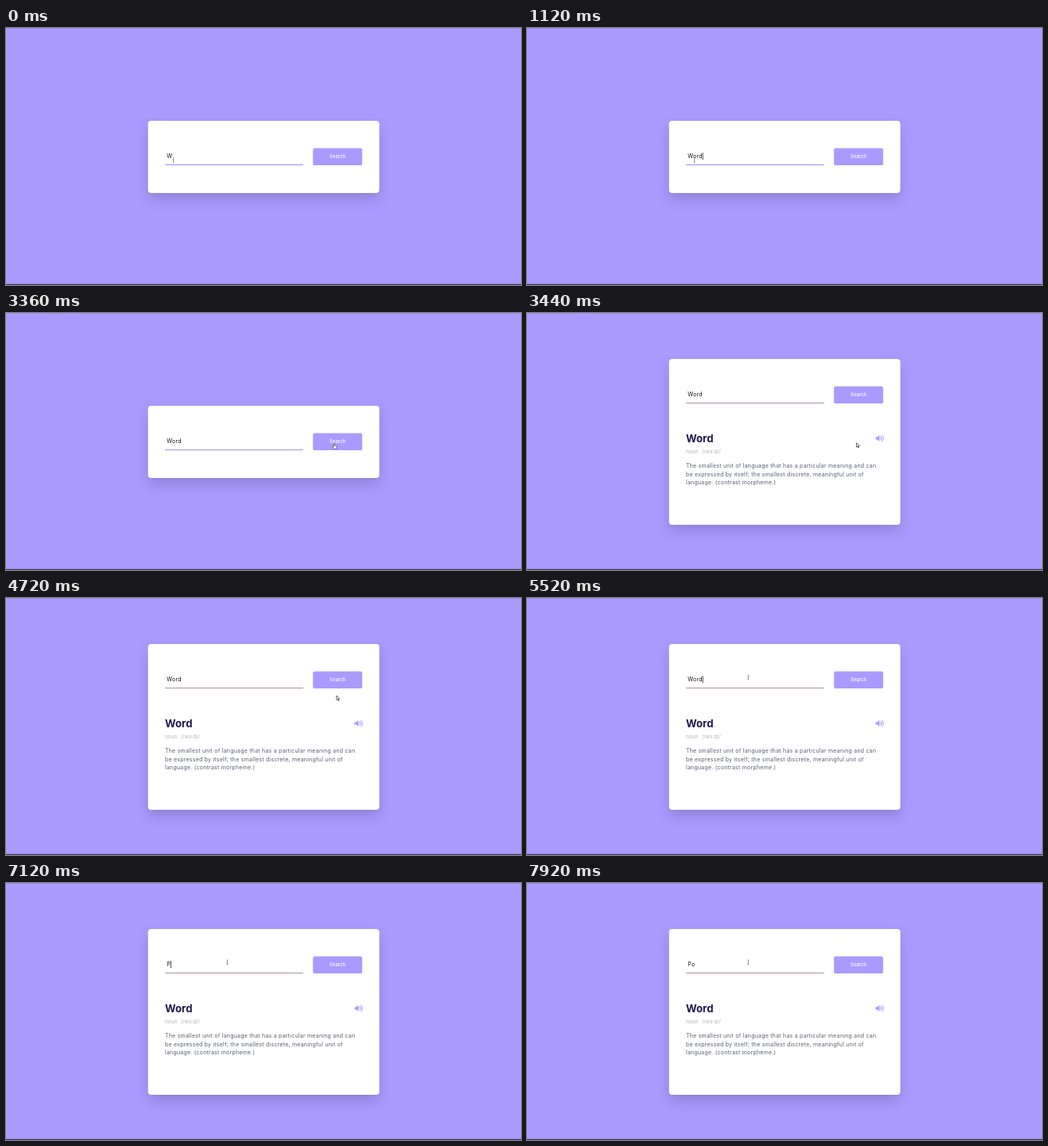
An HTML page for the animation above (8000 ms loop, 648x324 px).

```html
<!DOCTYPE html>
<html lang="en">
<head>
<meta charset="utf-8">
<title>Dictionary search</title>
<style>
  html, body { margin: 0; width: 100%; height: 100%; overflow: hidden; background: #ab9aff; }
  svg { display: block; width: 648px; height: 324px; font-family: Inter, "Open Sans", sans-serif; }
  text { white-space: pre; }
  .card { fill: #fff; filter: drop-shadow(0 8.6px 8px rgba(38, 33, 61, .2)); }
  .accent { fill: #ab9aff; }
  .typed { font-size: 7px; letter-spacing: .033em; fill: #111; }
  .search { font-size: 6px; fill: #fff; text-anchor: middle; font-weight: 500; }
  .word { font-size: 13.2px; font-weight: 700; fill: #1f194c; }
  .details { font-size: 6.5px; fill: #b0afba; }
  .meaning { font-size: 7px; letter-spacing: .033em; fill: #5a5c74; }
</style>
</head>
<body>
<svg viewBox="0 0 648 324">
  <rect class="accent" width="648" height="324"/>
  <rect width="648" height="1" fill="#9b8cdc"/>
  <rect y="322.8" width="648" height="1.2" fill="#3b3650"/>
  <rect id="card" class="card" x="178.7" width="291" rx="4"/>

  <g id="form">
    <rect id="underline" x="200" y="171.9" width="174" height="1.2"/>
    <text id="typed" class="typed" x="202.3" y="164.2"></text>
    <rect id="caret" y="157.2" width=".8" height="9" fill="#222"/>
    <rect class="accent" x="386.2" y="151.6" width="62" height="21.5" rx="2.2"/>
    <text class="search" x="417.2" y="164.3">Search</text>
  </g>

  <g id="result">
    <text class="word" x="200" y="163">Word</text>
    <text class="details" x="200" y="176.8">noun</text>
    <text class="details" x="220" y="176.8">//wɜːd//</text>
    <text class="meaning">
      <tspan x="200" y="195.3">The smallest unit of language that has a particular meaning and can</tspan>
      <tspan x="200" y="205.7">be expressed by itself; the smallest discrete, meaningful unit of</tspan>
      <tspan x="200" y="216.1">language. (contrast morpheme.)</tspan>
    </text>
    <path class="accent" d="M438.6 156.4h2l2.8-2.4v8l-2.8-2.4h-2z"/>
    <path d="M444.6 156.6q1.4 1.4 0 2.8M445.7 155.2q2.6 2.8 0 5.6M446.8 153.9q4 4.1 0 8.2"
          fill="none" stroke="#ab9aff" stroke-width=".9" stroke-linecap="round"/>
  </g>

  <g id="pointer">
    <path id="beam" d="M0-3V3M-.7 3H.7" fill="none" stroke="#555" stroke-width=".7"/>
    <path id="hand" fill="#fff" stroke="#333" stroke-width=".6" stroke-linejoin="round"
          d="M-.6 .4Q0-.4 .6 .4V2.6L2.6 3.1Q3.2 3.3 3 4.4L2.4 7H-.2L-1.9 4.5Q-1.8 3.7-.6 4.3z"/>
    <path id="arrow" fill="#fff" stroke="#222" stroke-width=".7" stroke-linejoin="round"
          d="M0 0V5.4L1.3 4.3 2.2 6.3 3 5.9 2.2 4 3.8 3.8z"/>
  </g>
</svg>
<script>
const LOOP = 8000, OPEN_AT = 3440, LIFT = 59;
const $ = id => document.getElementById(id);
const show = (id, on) => $(id).setAttribute('visibility', on ? 'visible' : 'hidden');
const set = (id, attrs) => {
  for (const name in attrs) $(id).setAttribute(name, attrs[name]);
};

// [time, input text]
const typing = [
  [0, 'W'], [240, 'Wo'], [480, 'Wor'], [720, 'Word'],
  [6000, 'Wor'], [6160, 'Wo'], [6400, 'W'], [6720, ''], [7120, 'P'], [7360, 'Po']
];
// [time, x, y]
const path = [
  [0, 210.7, 166.3], [1200, 210.7, 166.3], [1920, 408, 166.8], [2320, 408, 166.8],
  [2880, 413, 164.4], [3360, 413, 164.4], [3440, 414.6, 163.7], [3760, 414.6, 163.7],
  [4320, 416, 123.2], [4720, 416, 123.2], [5360, 278.4, 99.6], [LOOP, 278.4, 99.6]
];
const REFOCUS_AT = 5440;

function pointerAt(t) {
  const i = path.findIndex(p => p[0] > t);
  const [t0, x0, y0] = path[i - 1], [t1, x1, y1] = path[i];
  const u = (t - t0) / (t1 - t0), k = u * u * (3 - 2 * u);
  return [x0 + (x1 - x0) * k, y0 + (y1 - y0) * k];
}

function draw(t) {
  const open = t >= OPEN_AT, lift = open ? LIFT : 0;
  set('card', { y: 117 - lift, height: open ? 209 : 91 });
  set('form', { transform: `translate(0 ${-lift})` });
  set('underline', { fill: open ? '#b99bb6' : '#ab9aff' });
  show('result', open);

  const [keyTime, text] = typing.filter(k => k[0] <= t).pop();
  $('typed').textContent = text;
  const focused = t < OPEN_AT - 80 || t >= REFOCUS_AT;
  const blinkStart = t >= REFOCUS_AT ? Math.max(keyTime, REFOCUS_AT) : keyTime;
  show('caret', focused && t >= 240 && (t - blinkStart) % 1000 < 500);
  set('caret', { x: 202.3 + (text ? $('typed').getComputedTextLength() : 0) });

  const [x, y] = pointerAt(t), formY = y + lift;
  const inRow = formY > 151 && formY < 173;
  const overInput = inRow && x > 200 && x < 374;
  const overButton = inRow && x > 386 && x < 448;
  set('pointer', { transform: `translate(${x} ${y})` });
  show('beam', overInput);
  show('hand', overButton);
  show('arrow', !overInput && !overButton);
}

const start = performance.now();
function frame() {
  draw((performance.now() - start) % LOOP);
  requestAnimationFrame(frame);
}
frame();
</script>
</body>
</html>
```
